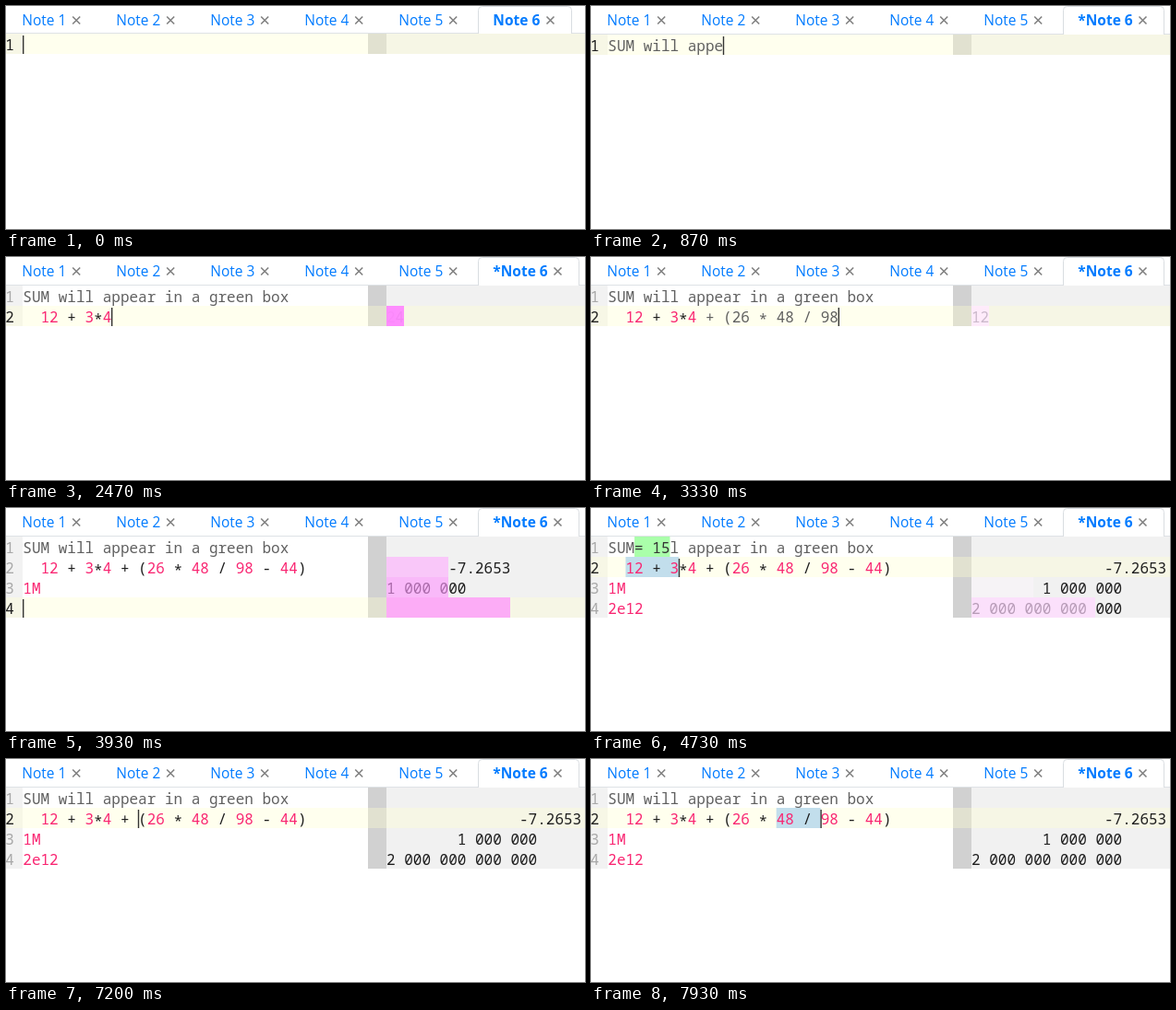
An HTML page with a canvas that plays this animation: 627 px wide and 242 px high, repeating every 8000 ms.

```html
<!DOCTYPE html>
<html lang="en">
<head>
<meta charset="utf-8">
<title>Notebook calculator</title>
<style>
  html, body { margin: 0; width: 100%; height: 100%; overflow: hidden; background: #fff; }
  canvas { display: block; }
</style>
</head>
<body>
<canvas id="stage" width="627" height="242"></canvas>
<script>
const ctx = document.getElementById('stage').getContext('2d');
const WIDTH = 627, HEIGHT = 242, LOOP = 8000;
const CELL = 9.6, ROW = 22, TEXT_X = 18.3, SPLIT_X = 392, RESULT_X = 412;
const MONO = '16px "Noto Sans Mono", monospace';
const UI = '15.5px "Open Sans", sans-serif';
const GREY = '#606060', DARK = '#1e1e1e', PINK = '#f92672';

const SCRIPT = 'SUM will appear in a green box\n  12 + 3*4 + (26 * 48 / 98 - 44)\n1M\n2e12';
const CHARS_PER_TICK = 1.19, FIRST_TICK = 3, PULSE_TICKS = 15;

// [start tick, row, width in characters]
const PULSES = [
  [32, 1, 1], [35, 1, 2], [36, 1, 2], [37, 1, 2], [39, 1, 2], [55, 1, 7],
  [57, 2, 7], [59, 3, 14], [62, 3, 14]
];

function rect(x, y, w, h, color) {
  ctx.fillStyle = color;
  ctx.fillRect(x, y, w, h);
}

function text(str, x, y, color, font) {
  ctx.font = font;
  ctx.fillStyle = color;
  ctx.fillText(str, x, y);
}

// Asterisks sit on the math axis.
function mono(str, x, y, color) {
  [...str].forEach((ch, i) => {
    if (ch !== ' ') text(ch, x + i * CELL, y + (ch === '*' ? 3 : 0), color, MONO);
  });
}

function drawTab(index, bar, starred) {
  const x = index * 102 + 1, active = index === 5;
  const width = starred ? 110 : 102;
  if (active) {
    ctx.beginPath();
    ctx.moveTo(x + .5, bar + 1);
    ctx.lineTo(x + .5, 4.5);
    ctx.quadraticCurveTo(x + .5, .5, x + 4.5, .5);
    ctx.lineTo(x + width - 4.5, .5);
    ctx.quadraticCurveTo(x + width - .5, .5, x + width - .5, 4.5);
    ctx.lineTo(x + width - .5, bar + 1);
    ctx.fillStyle = '#fff';
    ctx.fill();
    ctx.strokeStyle = '#d9dde1';
    ctx.lineWidth = 1;
    ctx.stroke();
  }
  const label = (active && starred ? '*' : '') + 'Note ' + (index + 1);
  text(label, x + 16.3, 21, '#007bff', (active ? 'bold ' : '') + UI);
  const cx = x + (active ? width - 23.5 : 75.2), cy = 15.5, r = 4;
  ctx.strokeStyle = '#808080';
  ctx.lineWidth = 1.6;
  ctx.beginPath();
  ctx.moveTo(cx - r, cy - r);
  ctx.lineTo(cx + r, cy + r);
  ctx.moveTo(cx + r, cy - r);
  ctx.lineTo(cx - r, cy + r);
  ctx.stroke();
}

function drawLine(line, row, y) {
  if (row === 0) return mono(line, TEXT_X, y, GREY);
  if (row > 1) return mono(line, TEXT_X, y, PINK);
  // An unfinished tail stays plain until its bracket closes.
  const tail = line.includes(')') ? line.length : line.indexOf('+', 8);
  const parsed = tail < 0 ? line.length : tail;
  [...line].forEach((ch, i) => {
    const color = i >= parsed ? GREY : /\d/.test(ch) ? PINK : DARK;
    mono(ch, TEXT_X + i * CELL, y, color);
  });
}

function resultOf(line, row) {
  if (row === 0) return '';
  if (row === 1) {
    const n = line.length;
    if (line.includes(')')) return '-7.2653';
    return n < 3 ? '' : n < 4 ? '1' : n < 8 ? '12' : n < 9 ? '15' : n < 10 ? '12' : n < 12 ? '24' : '12';
  }
  if (row === 2) return line === '1M' ? '1 000 000' : line;
  return { '2': '2', '2e': '2', '2e1': '20', '2e12': '2 000 000 000 000' }[line] || '';
}

// Caret position, selection start and popover at a tick.
function cursorAt(tick, lines) {
  const last = lines.length - 1;
  if (tick < 63) return { row: last, col: lines[last].length };
  if (tick < 64) return { row: 2, col: 2 };
  if (tick < 67) return { row: 1, col: Math.max(2, 68 - tick), };
  if (tick < 89) {
    const col = Math.min(8, Math.floor(3 + (tick - 67) * 1.25));
    return { row: 1, col, from: 2, sum: col === 8 ? '= 15' : '', hidden: tick >= 79 && tick < 86 };
  }
  if (tick < 105) {
    return { row: 1, col: Math.min(10, tick - 80), from: 2, sum: tick > 89 ? '= 24' : '', hidden: tick >= 97 };
  }
  const col = tick - 95;
  return { row: 1, col, from: col > 19 ? 19 : undefined };
}

function drawPulse([start, row, width], tick, top) {
  const p = (tick - start) / PULSE_TICKS;
  if (p < 0 || p >= 1) return;
  const color = `rgba(255, ${136 + 119 * p}, 255, ${(2 - p) / 3})`;
  rect(RESULT_X, top + row * ROW, Math.round(width * CELL), ROW, color);
}

function draw(time) {
  const tick = Math.floor(time * .015 + .1);
  const starred = tick >= FIRST_TICK && tick < 79 || tick >= 105;
  const bar = starred ? 30 : 29, top = bar + 1;
  const typed = Math.max(0, Math.floor((tick - FIRST_TICK + 1) * CHARS_PER_TICK));
  const lines = SCRIPT.slice(0, typed).split('\n');
  const cursor = cursorAt(tick, lines);

  rect(0, 0, WIDTH, HEIGHT, '#fff');
  rect(0, bar, WIDTH, 1, '#dee2e6');
  for (let i = 0; i < 6; i++) drawTab(i, bar, starred);

  const height = lines.length * ROW;
  rect(0, top, 18, height, '#f2f2f2');
  rect(SPLIT_X, top, 20, height, '#d1d1d1');
  rect(RESULT_X, top, WIDTH - RESULT_X, height, '#f1f1f1');
  const rowTop = top + cursor.row * ROW;
  rect(0, rowTop, WIDTH, ROW, 'rgba(255, 255, 204, .333)');
  if (cursor.from !== undefined) {
    rect(TEXT_X + cursor.from * CELL, rowTop, (cursor.col - cursor.from) * CELL, ROW, '#c2deec');
  }

  const results = lines.map(resultOf);
  const whole = results.map(r => r.split('.')[0].length);
  const widest = Math.max(...whole);
  lines.forEach((line, row) => {
    const y = top + row * ROW + 18;
    mono(String(row + 1), -.8, y, row === cursor.row ? DARK : '#a8a8a8');
    drawLine(line, row, y);
    mono(results[row], RESULT_X + (widest - whole[row]) * CELL, y, DARK);
  });
  PULSES.forEach(pulse => drawPulse(pulse, tick, top));

  if (cursor.sum) {
    const x = TEXT_X + (cursor.from + (cursor.col - cursor.from - 4) / 2) * CELL;
    rect(x, rowTop - ROW, 4 * CELL, ROW, '#aaffaa');
    mono(cursor.sum, x, rowTop - 4, '#333');
  }
  if (!cursor.hidden) rect(18 + cursor.col * CELL, rowTop + 2, 1.4, 20, '#333');
}

const began = performance.now();
function loop() {
  draw((performance.now() - began) % LOOP);
  requestAnimationFrame(loop);
}
loop();
</script>
</body>
</html>
```
